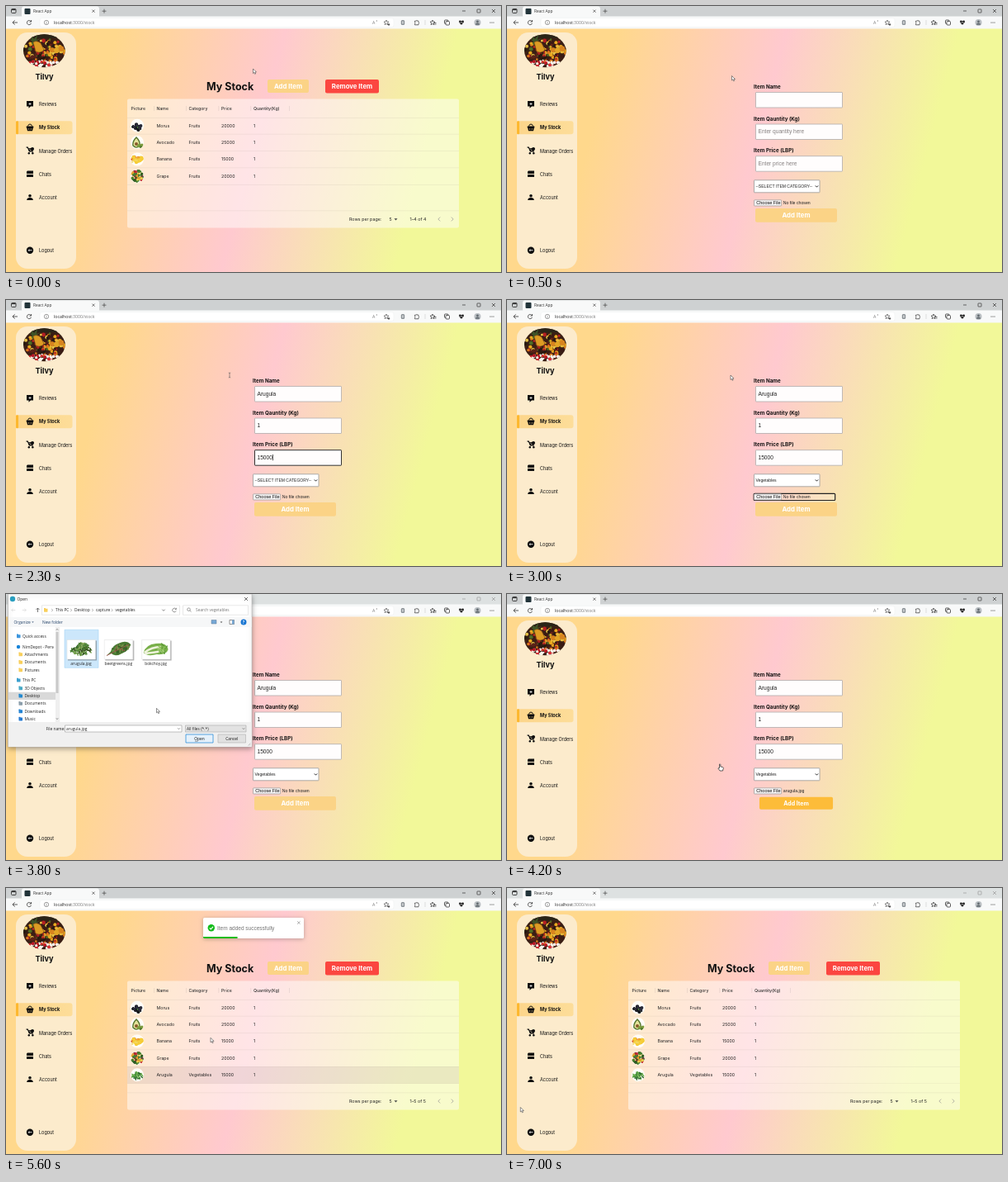
Recreate the animation shown at these times as an HTML page with a canvas. Size 600 by 322 pixels, loop 7100 ms.

```html
<!DOCTYPE html>
<html lang="en">
<head>
<meta charset="utf-8">
<title>Stock</title>
<style>
html, body { margin: 0; height: 100%; overflow: hidden; background: #fff; }
canvas { display: block; width: 600px; height: 322px; }
</style>
</head>
<body>
<canvas id="stage" width="600" height="322"></canvas>
<script>
const ctx = document.getElementById('stage').getContext('2d');
const LOOP = 7100, STEP = 100;
const UI = 'Inter, sans-serif', FIELD = '"Liberation Sans", sans-serif', SYS = '"Open Sans", sans-serif';
const FRUIT = ['#e9a91f', '#b51f22', '#d97a1c', '#4d6b25', '#e8c548', '#3a1a14', '#5c2318', '#271a10'];
const ITEMS = [
  ['Morus', 'Fruits', '20000', ['#15161d', '#2b2c3a', '#0c0d12', '#4f8a3a']],
  ['Avocado', 'Fruits', '25000', ['#8fae45', '#e3e09a', '#3f6427', '#8a5a2c']],
  ['Banana', 'Fruits', '15000', ['#f5c931', '#d9452c', '#f0e08a', '#eea22e']],
  ['Grape', 'Fruits', '20000', ['#c52c2f', '#e4a02c', '#47802e', '#7a2344', '#f0d254', '#2f5a24']],
  ['Arugula', 'Vegetables', '15000', ['#3f8a35', '#68ad4b', '#2a6a2b', '#8cc36a']]
];

function text(s, x, y, size, color = '#222', font = UI, weight = 400, align = 'left') {
  ctx.font = `${weight} ${size}px ${font}`;
  ctx.textAlign = align;
  ctx.fillStyle = color;
  ctx.fillText(s, x, y);
}
function rect(x, y, w, h, fill, r = 0, stroke, lw = 1) {
  ctx.beginPath();
  ctx.roundRect(x, y, w, h, r);
  if (fill) { ctx.fillStyle = fill; ctx.fill(); }
  if (stroke) { ctx.strokeStyle = stroke; ctx.lineWidth = lw; ctx.stroke(); }
}
function disc(x, y, r, fill, stroke, lw = .8) {
  ctx.beginPath();
  ctx.arc(x, y, r, 0, 7);
  if (fill) { ctx.fillStyle = fill; ctx.fill(); }
  if (stroke) { ctx.strokeStyle = stroke; ctx.lineWidth = lw; ctx.stroke(); }
}
function path(d, x, y, fill, stroke = '#444', lw = .8) {
  ctx.save();
  ctx.translate(x, y);
  const p = new Path2D(d);
  if (fill) { ctx.fillStyle = fill; ctx.fill(p); }
  if (stroke) { ctx.strokeStyle = stroke; ctx.lineWidth = lw; ctx.stroke(p); }
  ctx.restore();
}
function seeded(seed) {
  return () => (seed = (seed * 16807) % 2147483647) / 2147483647;
}
// Calls paint(x, y, color, random) at seeded places inside an ellipse.
function scatter(cx, cy, rx, ry, count, colors, seed, paint) {
  const rnd = seeded(seed * 7919);
  for (let i = 0; i < count; i++) {
    const a = rnd() * 6.283, d = Math.sqrt(rnd());
    paint(cx + Math.cos(a) * d * rx, cy + Math.sin(a) * d * ry,
      colors[Math.floor(rnd() * colors.length)], rnd());
  }
}
function blobs(cx, cy, rx, ry, count, size, colors, seed) {
  scatter(cx, cy, rx, ry, count, colors, seed, (x, y, c, u) => disc(x, y, size * (.6 + u * .7), c));
}
function leaves(cx, cy, rx, ry, count, colors, seed) {
  scatter(cx, cy, rx, ry, count, colors, seed, (x, y, c, u) => {
    ctx.fillStyle = c;
    ctx.beginPath();
    ctx.ellipse(x, y, 2.4, .8, u * 3.1, 0, 7);
    ctx.fill();
  });
}

function background() {
  const dx = .966 * 328, dy = .259 * 328;
  const g = ctx.createLinearGradient(300 - dx, 174 - dy, 300 + dx, 174 + dy);
  [[0, '#ffd88c'], [.2, '#ffd88c'], [.5, '#ffc9cf'], [.81, '#f2f899'], [1, '#f2f899']]
    .forEach(s => g.addColorStop(...s));
  ctx.fillStyle = g;
  ctx.fillRect(0, 27, 600, 295);
}

function browser(focused) {
  const ink = focused ? '#333' : '#999';
  rect(0, 0, 600, 13, focused ? '#ced1d2' : '#dde1e1');
  rect(19, .5, 94, 14, '#f8f9f9', 3);
  rect(0, 12.5, 600, 15, '#f8f9f9');
  rect(6.5, 3.5, 5.5, 5, null, 1, '#333', .9);
  path('M0 0H5', 6.7, 4.5, null, '#333', 1.2);
  rect(22.5, 3, 7, 7, '#22343a', 1);
  text('React App', 33, 8.2, 4.8, '#333', SYS);
  path('M-1.6 -1.6L1.6 1.6M1.6 -1.6L-1.6 1.6', 106, 6.2, null, '#444', .7);
  path('M-2.5 0H2.5M0 -2.5V2.5', 119, 6.2, null, '#444', .7);
  path('M-2 0H2', 555, 6, null, ink, .7);
  rect(571, 4, 4, 4, null, .5, ink, .7);
  path('M-2 -2L2 2M2 -2L-2 2', 591, 6, null, ink, .7);

  rect(41, 14.5, 429, 11.2, '#fff', 3, '#eceeee', .5);
  path('M3 0H-3L-.3 -2.6M-3 0L-.3 2.6', 11, 20, null, '#333');
  path('M2.3 -1.2A2.6 2.6 0 1 0 2.5 .9M2.6 -3V-.9H.5', 28, 20, null, '#333');
  disc(49, 20, 2.7, null, '#666', .6);
  path('M0 -.4V1.5M0 -1.5V-1', 49, 20, null, '#666', .7);
  text('localhost', 58, 21.9, 5.2, '#222', SYS);
  text(':3000/stock', 58 + ctx.measureText('localhost').width, 21.9, 5.2, '#777', SYS);
  text('A', 444, 22, 5.2, '#777', SYS);
  path('M0 0Q1.2 1 0 2', 449, 17, null, '#777', .6);
  const star = 'M0 -3L.9 -1L3 -.8L1.4 .6L1.9 2.7L0 1.6L-1.9 2.7L-1.4 .6L-3 -.8L-.9 -1Z';
  path(star, 461, 20, null, '#555', .7);
  disc(464, 22.4, 1.2, '#555');
  rect(478.8, 17, 4.4, 6, '#8b9196', 1.5);
  rect(480, 18.3, 2, 3.4, '#c9ccce', .8);
  path('M-2.5 -1.8H-1A1.2 1.2 0 0 1 1 -1.8H2V-.3A1 1 0 0 1 2 1.5V2.8H-2.5V1.5A1 1 0 0 0 -2.5 -.3Z', 498, 20, null, '#444');
  path('M0 -3V3', 508, 20, null, '#ccc', .6);
  path(star, 517, 20, null, '#333', .7);
  path('M0 0H3M1 1.6H3', 518.5, 20.5, null, '#333', .7);
  rect(531.5, 17, 4.5, 4.5, null, 1, '#333', .8);
  rect(533, 18.5, 4.5, 4.5, '#fff', 1, '#333', .8);
  path('M0 2.8C-5 -.5 -2.7 -4 0 -1.7C2.7 -4 5 -.5 0 2.8Z', 552, 20, '#222', null);
  path('M-2.8 .2H-.8L.2 -1L1 .8H2.8', 552, 20, null, '#fff', .5);
  disc(571.5, 20, 4, '#b9bec2');
  disc(571.5, 18.9, 1.4, '#626a70');
  path('M-2.5 2A2.5 2.3 0 0 1 2.5 2Z', 571.5, 20.8, '#626a70', null);
  [-2, 0, 2].forEach(d => disc(589 + d, 20, .6, '#333'));
}

function sidebar() {
  rect(12, 32, 73, 286, '#fcebcc', 14);
  ctx.save();
  ctx.beginPath();
  ctx.ellipse(46.3, 54.3, 25.3, 20, 0, 0, 7);
  ctx.clip();
  rect(20, 33, 53, 42, '#3a1f14');
  blobs(47, 54, 25, 14, 130, 1.9, FRUIT, 41);
  rect(20, 33, 53, 6, '#2a2418');
  path('M0 0L-8 -7L-3 -4L-4 -10L0 -5L4 -10L3 -4L8 -6Z', 34, 45, '#3d5428', null);
  path('M-4 -4Q0 -7 5 -3L9 5Q5 10 -1 7Z', 37, 48, '#dd9c24', '#8a5518', .7);
  blobs(60, 52, 8, 5, 10, 2.6, ['#e2a526', '#d8851f', '#e9bd3b'], 6);
  blobs(46, 70, 20, 4, 46, 1.6, ['#b81825', '#f1ece2', '#d92b2f', '#f7f4ec'], 9);
  ctx.restore();
  text('Tilvy', 46.5, 88.6, 9.2, '#111', UI, 700, 'center');

  const g = ctx.createLinearGradient(12, 0, 80, 0);
  g.addColorStop(0, '#fcd58a');
  g.addColorStop(1, '#fddd99');
  rect(12, 139.3, 68.5, 16, g, 3);
  rect(12, 139.3, 3, 16, '#fdb82f', 1);
  [['Reviews', 121.3], ['My Stock', 149.3, 700], ['Manage Orders', 177.6], ['Chats', 205.6],
    ['Account', 233.7], ['Logout', 297.7]].forEach(([s, y, w]) => text(s, 40, y, 5.5, '#111', UI, w));
  const k = '#0c0c0c';
  path('M-4 -4H4V2.5H1L-1.5 4.7V2.5H-4Z', 29, 119, k, null);
  path('M0 -2V1M-1.5 -.5H1.5', 29, 119, null, '#fff');
  path('M-4.3 -1.5H4.3V.5H3.8L3 4.2H-3L-3.8 .5H-4.3Z', 29, 147, k, null);
  path('M-2.5 -1.5Q-2 -4 0 -4Q2 -4 2.5 -1.5', 29, 147, null, k, 1);
  path('M-1.3 1V3M1.3 1V3', 29, 147, null, '#fddb92', .6);
  path('M-4.5 -4H-2.7L-.7 1H4M-2.2 -2.2H3.7L2 .8', 29, 175, k, k, 1.1);
  disc(27.8, 178.3, 1.2, k);
  disc(32.3, 178.3, 1.2, k);
  disc(32, 173, 2, k);
  path('M-3 -4H4V-.5H-4V-3ZM-4 .5H4V3.5H-4Z', 29, 203.5, k, null);
  disc(29, 229.8, 1.8, k);
  path('M-3.8 3.6Q-3.8 .6 0 .6Q3.8 .6 3.8 3.6Z', 29, 231.5, k, null);
  disc(29, 295.7, 4.2, k);
  path('M2.6 0H-1.8M-.5 -1.3L-1.8 0L-.5 1.3', 29, 295.7, null, '#fff');
}

function button(label, x, y, w, h, fill, ink, scale = 1) {
  ctx.save();
  ctx.translate(x + w / 2, y + h / 2);
  ctx.scale(scale, scale);
  rect(-w / 2, -h / 2, w, h, fill, 2);
  text(label, 0, 2.8, 7.8, ink, UI, 700, 'center');
  ctx.restore();
}

function productPhoto(i, x, y) {
  const colors = ITEMS[i][3];
  disc(x, y, 8, '#fffdf8');
  ctx.save();
  ctx.beginPath();
  ctx.arc(x, y, 8, 0, 7);
  ctx.clip();
  if (i === 0) blobs(x, y + 2, 6, 3.5, 24, 1.8, colors, 17);
  if (i === 1) {
    path('M0 -6Q5 -1 4 4Q0 8 -4 4Q-5 -1 0 -6Z', x - 1, y, '#e4e29a', '#55762f', 1.4);
    disc(x - 1, y + 2, 2, '#8a5a2c');
    blobs(x + 4, y + 4, 2, 2, 6, 1.7, ['#4e7730', '#7c9c3c'], 3);
  }
  if (i === 2) {
    blobs(x, y + 1, 7, 5, 16, 2, colors, 23);
    path('M-6 -2Q0 4 6 -1M-6 1Q0 7 6 2', x, y - 1, null, '#f6cf3a', 1.8);
  }
  if (i === 3) blobs(x, y, 7.5, 7, 50, 1.7, colors, 31);
  if (i === 4) leaves(x, y + 1, 6, 3.7, 34, colors, 13);
  ctx.restore();
}

function stockList(count, hoverAdd, hoverRow) {
  text('My Stock', 243, 101.7, 12.5, '#111', UI, 700);
  button('Add Item', 317, 89, 50, 16, hoverAdd ? '#fdbc3a' : '#fbd386', '#fff');
  button('Remove Item', 387, 89, 65, 16.5, '#fb4640', '#fff');
  rect(147, 112.5, 402, 156, 'rgba(255,255,255,.5)', 2);
  const cols = [151.5, 182.5, 221.5, 261, 300];
  ['Picture', 'Name', 'Category', 'Price', 'Quantity(Kg)'].forEach((s, i) => text(s, cols[i], 125.7, 5.2, '#333', UI, 500));
  [179, 218, 257.5, 296.5, 343].forEach(x => rect(x, 121, .6, 6, 'rgba(160,150,150,.3)'));
  const line = y => rect(147, y, 402, .7, 'rgba(150,140,130,.15)');
  line(135);
  ITEMS.slice(0, count).forEach(([name, kind, price], i) => {
    const y = 144.7 + i * 20.4;
    if (hoverRow && i === 4) rect(147, y - 10, 402, 20.4, 'rgba(90,60,70,.09)');
    productPhoto(i, 159, y);
    [name, kind, price, '1'].forEach((s, j) => text(s, cols[j + 1], y + 1.9, 5.25));
    line(y + 10.1);
  });
  line(247.5);
  text('Rows per page:', 416, 260, 5.35);
  text('5', 464.5, 260, 5.4);
  path('M-2 -1H2L0 1.2Z', 472.5, 258.3, '#444', null);
  text(`1–${count} of ${count}`, 489.5, 260, 5.35);
  path('M1.2 -2.4L-1.2 0L1.2 2.4', 525, 258, null, '#a3a09a');
  path('M-1.2 -2.4L1.2 0L-1.2 2.4', 541, 258, null, '#a3a09a');
}

function field(y, label, value, hint, focused, blink) {
  text(label, 299, y - 3.8, 6.25, '#111', UI, 700);
  rect(301.5, y + .5, 105, 18.5, '#fffdfd', .5, focused ? '#333' : '#b0abab', focused ? 1 : .8);
  text(value || hint, 304.5, y + 11.8, 6.6, value ? '#222' : '#858080', FIELD);
  if (focused && blink) rect(304.7 + (value ? ctx.measureText(value).width : 0), y + 5.7, .7, 7.4, '#111');
}

function form(t) {
  const typed = (s, from) => s.slice(0, Math.max(0, Math.floor((t - from) / STEP) + 1));
  const blink = t % 1000 < 500;
  field(104, 'Item Name', typed('Arugula', 800), '', t >= 600 && t < 1500, blink);
  field(142.5, 'Item Qauntity (Kg)', typed('1', 1600), 'Enter quantity here', t >= 1500 && t < 1800, blink);
  field(181.2, 'Item Price (LBP)', typed('15000', 1900), 'Enter price here', t >= 1800 && t < 2500, blink);
  const onSelect = t >= 2500 && t < 2800, onFile = t >= 2800 && t < 3100;
  rect(299.5, 210.8, 79.5, 15, '#fff', .5, onSelect ? '#333' : '#999', onSelect ? 1 : .8);
  text(t < 2600 ? '--SELECT ITEM CATEGORY--' : 'Vegetables', 301.5, 220.1, 5.05, '#222', FIELD);
  path('M-1.6 -.8L0 .9L1.6 -.8', 375.5, 218.3, null, '#222', 1);
  if (onFile) rect(299.2, 234.3, 98.5, 8.2, 'rgba(255,235,235,.2)', 1, '#222', 1.2);
  rect(299.5, 234.8, 33.2, 7.2, '#f2f1f1', .8, '#8f8b8b', .6);
  text('Choose File', 302.3, 240.3, 5.5, '#111', FIELD);
  text(t < 4000 ? 'No file chosen' : 'arugula.jpg', 334.8, 240.3, 5.2, '#222', FIELD);
  const hover = t >= 4100;
  button('Add Item', 301, 245, 99, 16.7, hover ? '#fdbc39' : '#fbd386', '#fff', t >= 4200 ? .9 : 1);
}

function folder(x, y, color = '#f8cf5c') {
  rect(x, y - 1.8, 4.5, 4, color, .4);
  rect(x, y - 2.5, 2, 1.5, color);
}

function thumbnail(i, x) {
  rect(x - 16, 56.5, 35, 24, 'rgba(0,0,0,.3)');
  rect(x - 17, 55.5, 34.5, 23.5, '#fff', 0, '#dcdcdc', .5);
  ctx.save();
  ctx.translate(x, 67);
  if (i === 0) {
    leaves(0, 1, 12, 5, 75, ['#2d5a24', '#4b7f33', '#6f9c48', '#39481f'], 13);
    leaves(2, -4, 6, 4, 24, ['#4b7f33', '#88a85a'], 8);
  } else if (i === 1) {
    ctx.rotate(-.3);
    path('M-16 3L-10 0Q-6 -7 3 -7Q13 -8 16 -1Q11 6 2 6Q-7 8 -10 2Z', 0, 0, '#4a7a33', null);
    leaves(3, 0, 10, 4, 45, ['#5f9342', '#356026', '#7a8f48'], 5);
    path('M-16 3L14 -2M-5 1L0 -5M2 0L7 4', 0, 0, null, '#a0524a', .8);
  } else {
    path('M-15 4Q-12 -6 0 -7Q13 -9 15 0Q13 7 1 6Q-10 9 -15 4Z', 0, 0, '#79b04a', null);
    path('M-14 4Q-5 -3 6 -3M-13 5Q-3 4 8 2', 0, 0, null, '#eef2dc', 2.6);
    leaves(8, -1, 6, 5, 22, ['#5d9a38', '#8fc25c', '#a9cf7d'], 4);
  }
  ctx.restore();
}

function fileDialog(t) {
  const picked = t >= 3500, put = (s, x, y, c = '#222') => text(s, x, y, 4.85, c, SYS);
  ctx.save();
  ctx.shadowColor = 'rgba(0,0,0,.35)';
  ctx.shadowBlur = 6;
  ctx.shadowOffsetY = 2;
  rect(2.5, 0, 295.5, 185, '#fff', 0, '#b5b5b5', .6);
  ctx.restore();
  disc(8, 6, 3.2, '#2b9fc0');
  put('Open', 13.5, 7.9);
  path('M-2 -2L2 2M2 -2L-2 2', 291, 6, null, '#333', .7);
  path('M2.3 0H-2.3L-.3 -2M-2.3 0L-.3 2', 9, 19.5, null, '#ddd');
  path('M-2.3 0H2.3L.3 -2M2.3 0L.3 2', 22, 19.5, null, '#ddd');
  path('M0 2.5V-2.5L-2 -.5M0 -2.5L2 -.5', 38.5, 19.5, null, '#555');
  rect(43.5, 13.8, 167, 11.5, '#fff', 0, '#d9d9d9', .6);
  folder(46, 19.5);
  [['This PC', 60], ['Desktop', 83], ['capture', 109], ['vegetables', 132.5]].forEach(([s, x]) => {
    put(s, x, 21.3);
    path('M-.8 -1.5L.8 0L-.8 1.5', x - 4, 19.6, null, '#777', .6);
  });
  path('M-1.7 -.8L0 .9L1.7 -.8', 191, 19.5, null, '#666');
  path('M2 -1.2A2.3 2.3 0 1 0 2.2 .9M2.4 -2.7V-.9H.7', 204, 19.5, null, '#666', .7);
  rect(214.5, 13.8, 79, 11.5, '#fff', 0, '#d9d9d9', .6);
  disc(221.5, 18.7, 1.8, null, '#777', .7);
  path('M0 0L1.7 1.7', 222.8, 20, null, '#777', .7);
  put('Search vegetables', 230, 21.3, '#777');
  rect(3, 28, 294.5, 12, '#f6f7f8');
  put('Organize', 9.5, 35.7, '#24436a');
  path('M-1.2 -.6H1.2L0 .8Z', 32.5, 34, '#24436a', null);
  put('New folder', 44, 35.7, '#24436a');
  rect(249, 31.5, 6, 4.5, '#76a8d6', 0, '#607a94', .5);
  path('M-1.4 -.6H1.4L0 .9Z', 261, 34, '#444', null);
  rect(271, 31.5, 5.5, 5, '#fff', 0, '#666', .7);
  rect(274, 31.5, 2.5, 5, '#76a8d6');
  disc(288, 34, 3.5, '#1976d2');
  text('?', 288, 35.9, 5, '#fff', SYS, 700, 'center');

  rect(3, 118.8, 57, 9.3, '#d9d9d9');
  ctx.save();
  ctx.beginPath();
  ctx.rect(0, 40, 58, 114);
  ctx.clip();
  [['Quick access', 51, 0, '#3b95dd'], ['NimDepot - Personal', 64, 0, '#1683d8'], ['Attachments', 73, 1], ['Documents', 82.5, 1],
    ['Pictures', 92, 1], ['This PC', 104.2, 0, '#3ba0cf'], ['3D Objects', 114, 1, '#48a9c5'], ['Desktop', 123.3, 1, '#2489cf'],
    ['Documents', 132.5, 1, '#8c9eab'], ['Downloads', 142, 1, '#2584d3'], ['Music', 151.3, 1, '#277bd1']]
    .forEach(([s, y, sub, c]) => {
      if (c === '#1683d8') disc(15, y, 2.2, c); else folder(sub ? 15.5 : 13, y, c);
      put(s, sub ? 22.5 : 20, y + 1.8);
    });
  ctx.restore();
  rect(60, 40, 4, 115, '#efefef');
  rect(60.5, 46, 3, 74, '#c9c9c9');
  path('M-1.2 .7L0 -.7L1.2 .7', 62, 43, null, '#555', .6);
  path('M-1.2 -.7L0 .7L1.2 -.7', 62, 151, null, '#555', .6);
  rect(64.5, 40, .6, 115, '#ddd');

  if (picked) rect(71, 43.3, 41, 46, '#cce7fb', 0, '#a5d5f5', .6);
  ['arugula.jpg', 'beetgreens.jpg', 'bokchoy.jpg'].forEach((s, i) => {
    const x = 91 + i * 45.3;
    thumbnail(i, x);
    text(s, x, 86.3, 4.85, '#222', SYS, 400, 'center');
  });

  rect(3, 155, 294.5, 30, '#f0f0f0');
  put('File name:', 48.5, 165);
  rect(71.5, 159, 141.5, 8, '#fff', 0, '#999', .6);
  if (picked) put('arugula.jpg', 73, 164.9);
  rect(217.5, 159, 73.5, 8, '#e2e2e2', 0, '#aaa', .6);
  put('All files (*.*)', 219, 164.9);
  [209.5, 288].forEach(x => path('M-1.3 -.7L0 .7L1.3 -.7', x, 163, null, '#555', .6));
  rect(218, 170, 33, 10, t >= 3700 ? '#e5f1fb' : '#e1e1e1', 0, '#1682d6', .7);
  text('Open', 234.5, 176.8, 4.85, '#111', SYS, 400, 'center');
  rect(229, 177.9, 3.5, .4, '#111');
  rect(257, 170, 33.5, 10, '#e1e1e1', 0, '#adadad', .6);
  text('Cancel', 273.7, 176.8, 4.85, '#111', SYS, 400, 'center');
  path('M0 3L3 0M1.7 3L3 1.7', 293.5, 180.5, null, '#999', .5);
}

function toast(t) {
  const start = 4700, end = 6065;
  if (t < start || t > 6300) return;
  const enter = Math.min(1, (t - start + STEP) / 300), leave = Math.max(0, (t - 6000) / 300);
  ctx.save();
  ctx.globalAlpha = Math.min(enter, 1 - leave);
  ctx.translate(0, -28 * (1 - enter) ** 2 - 25 * leave * leave);
  ctx.save();
  ctx.shadowColor = 'rgba(0,0,0,.25)';
  ctx.shadowBlur = 5;
  ctx.shadowOffsetY = 1;
  rect(239, 36, 122, 25, '#fff', 1.5);
  ctx.restore();
  disc(248.8, 48.3, 4.2, '#12bc1a');
  path('M-2 0L-.5 1.6L2.2 -1.5', 248.8, 48.3, null, '#fff', 1.1);
  text('Item added successfully', 256, 50.5, 6.5, '#757575', FIELD);
  path('M-1.7 -1.7L1.7 1.7M1.7 -1.7L-1.7 1.7', 354.8, 42, null, '#888', .7);
  rect(239, 58.9, 122 * Math.max(0, 1 - (t - start) / (end - start)), 2.1, '#12bc1a', [0, 0, 0, 1.5]);
  ctx.restore();
}

// Pointer stops: time, x, y
const ROUTE = [[0, 299.5, 76], [300, 274, 78], [400, 274, 78], [600, 271, 91], [3100, 271, 91], [3400, 73, 56],
  [3500, 73, 56], [3800, 182.5, 138.3], [3900, 182.5, 138.3], [4100, 257.5, 206], [4500, 257.5, 206],
  [4900, 262, 160], [5300, 252, 175], [5500, 248, 181.3], [6200, 248, 181.3], [6900, 16.3, 265.5], [7100, 16.3, 265.5]];

function pointer(t) {
  const i = Math.max(1, ROUTE.findIndex(p => p[0] > t));
  const [t0, x0, y0] = ROUTE[i - 1], [t1, x1, y1] = ROUTE[i];
  const u = (t - t0) / (t1 - t0), e = u * u * (3 - 2 * u);
  const x = x0 + (x1 - x0) * e, y = y0 + (y1 - y0) * e;
  if (t >= 600 && t < 2500) {
    path('M-1.2 -3Q0 -3 0 -2V2Q0 3 -1.2 3M1.2 -3Q0 -3 0 -2M0 2Q0 3 1.2 3', x, y, null, '#555', .6);
  } else if ((t >= 300 && t < 500) || (t >= 4100 && t < 4500)) {
    path('M0 0Q1 -.5 1.3 .5V3L4.2 3.6Q5 4 4.7 5.2L4 8H.5L-1.6 5Q-1.2 4 0 4.8Z', x, y, '#fff', '#222', .7);
  } else {
    path('M0 0V5.5L1.3 4.4L2.2 6.4L3.1 6L2.3 4H4Z', x, y, '#fff', '#444', .6);
  }
}

function draw(t) {
  const dialogOpen = t >= 3100 && t < 4000, inForm = t >= 400 && t < 4500;
  background();
  browser(!dialogOpen && t < 6900);
  sidebar();
  if (inForm) form(t);
  else stockList(t < 4500 ? 4 : 5, t >= 200 && t < 400, t >= 5400 && t < 6400);
  toast(t);
  if (dialogOpen) fileDialog(t);
  pointer(t);
}

const began = performance.now();
function tick() {
  const t = (performance.now() - began) % LOOP;
  ctx.clearRect(0, 0, 600, 322);
  draw(Math.floor(t / STEP) * STEP);
  requestAnimationFrame(tick);
}
tick();
</script>
</body>
</html>
```
